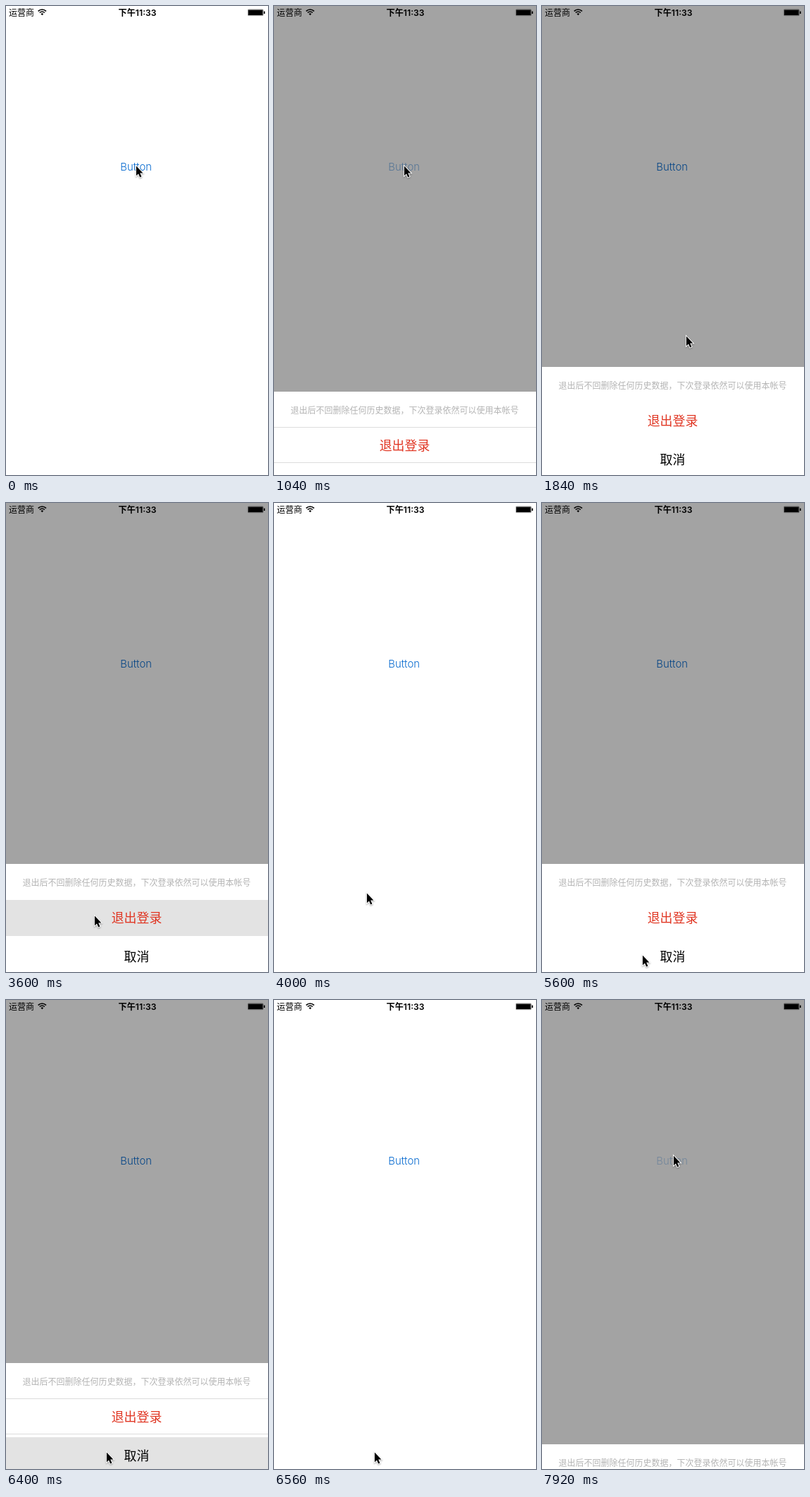
An HTML page with a canvas for the animation above (8 s loop, 372x664 px).

```html
<!DOCTYPE html>
<html lang="zh-CN">
<head>
<meta charset="utf-8">
<title>Action sheet</title>
<style>
  html, body { margin: 0; width: 100%; height: 100%; overflow: hidden; background: #fff; }
  canvas { display: block; width: 372px; height: 664px; }
</style>
</head>
<body>
<canvas id="stage" width="372" height="664"></canvas>
<script>
const W = 372, H = 664, LOOP = 8000, STEP = 80;
const SHEET_H = 153, SHOW_MS = 250, HIDE_MS = 180, FADE_MS = 470, DIM = 0.36;
const CJK = '"Noto Sans CJK SC", "Noto Sans CJK", sans-serif';
const LATIN = 'Inter, ' + CJK;
const ctx = document.getElementById('stage').getContext('2d');

// Each visit: button down, sheet shown, row pressed, sheet hidden
const visits = [
  { down: 690, show: 867, press: 3600, row: 'logout', hide: 3680 },
  { down: 4700, show: 4859, press: 6240, row: 'cancel', hide: 6385 },
  { down: 7580, show: 7842, press: Infinity, row: '', hide: Infinity }
];

// Pointer moves: when they begin and end, and where they lead
const home = { x: 184, y: 226 };
const moves = [
  { from: 1600, to: 1840, x: 204, y: 467 },
  { from: 1840, to: 3440, x: 125, y: 584 },
  { from: 3840, to: 4720, x: 190, y: 222 },
  { from: 5200, to: 5600, x: 142, y: 640 },
  { from: 6560, to: 7200, x: 188, y: 200 },
  { from: 7520, to: 7680, x: 186, y: 220 }
];

const clamp = v => Math.min(1, Math.max(0, v));
const ease = v => { v = clamp(v); return v * v * (3 - 2 * v); };
const mix = (a, b, k) => a + (b - a) * k;

function pointerAt(t) {
  let { x, y } = home;
  for (const m of moves) {
    const k = ease((t - m.from) / (m.to - m.from));
    x = mix(x, m.x, k);
    y = mix(y, m.y, k);
  }
  // Idle sweeps over the open sheet
  const k = clamp((t - 1840) / 1600), swing = Math.sin(Math.PI * k);
  x += 150 * swing * Math.sin(4 * Math.PI * k);
  y += 110 * swing * Math.sin(3 * Math.PI * k);
  return [Math.round(x), Math.round(y)];
}

function buttonAlpha(t) {
  const v = visits.find(v => t >= v.down && t < v.show + FADE_MS);
  if (!v) return 1;
  return t < v.show
    ? mix(1, 0.2, clamp((t - v.down) / 110))
    : mix(0.25, 1, ease((t - v.show) / FADE_MS));
}

function box(color, x, y, w, h) {
  ctx.fillStyle = color;
  ctx.fillRect(x, y, w, h);
}

function label(str, x, y, font, color, align = 'center') {
  ctx.font = font;
  ctx.fillStyle = color;
  ctx.textAlign = align;
  ctx.fillText(str, x, y);
}

function drawStatus() {
  label('运营商', 4, 13.7, '300 12px ' + CJK, '#000', 'left');
  label('下午11:33', 186.5, 13.7, '600 12.2px ' + LATIN, '#000');

  // Wi-Fi fan
  const a = Math.PI * 0.25;
  ctx.strokeStyle = '#000';
  ctx.lineWidth = 1.6;
  for (const r of [5, 8]) {
    ctx.beginPath();
    ctx.arc(51.3, 13, r, -Math.PI + a, -a);
    ctx.stroke();
  }
  ctx.fillStyle = '#000';
  ctx.beginPath();
  ctx.moveTo(51.3, 13.2);
  ctx.arc(51.3, 13, 2.7, -Math.PI + a, -a);
  ctx.fill();

  // Battery
  ctx.strokeStyle = 'rgba(0,0,0,0.6)';
  ctx.lineWidth = 0.6;
  ctx.beginPath();
  ctx.roundRect(343.3, 4.8, 22, 8.9, 1.5);
  ctx.stroke();
  box('#000', 344, 5.5, 20.6, 7.5);
  box('#000', 366, 7.5, 1.6, 3.5);
}

function drawSheet(t, v) {
  const gone = ease((t - v.hide) / HIDE_MS);
  const shown = ease((t - v.show) / SHOW_MS) * (1 - gone);
  box(`rgba(0,0,0,${DIM * (1 - gone)})`, 0, 0, W, H);

  const top = Math.round(H - SHEET_H * shown);
  box('#fff', 0, top, W, SHEET_H);
  if (shown < 1) {
    box('#dcdcdc', 0, top + 50, W, 1);
    box('#dcdcdc', 0, top + 100, W, 1);
  }
  if (t >= v.press) {
    if (v.row === 'logout') box('#e3e3e3', 0, top + 51, W, 51);
    else box('#e3e3e3', 0, top + 105, W, 48);
  }
  label('退出后不回删除任何历史数据，下次登录依然可以使用本帐号',
    185.5, top + 30.7, '300 12px ' + CJK, '#b4b4b4');
  label('退出登录', 185.5, top + 83, '17.9px ' + CJK, '#e03522');
  label('取消', 185.5, top + 138, '17.9px ' + CJK, '#000');
}

function drawPointer(x, y) {
  ctx.save();
  ctx.translate(x + 0.7, y);
  ctx.beginPath();
  ctx.moveTo(0.2, 0.6);
  ctx.lineTo(0.2, 14.2);
  ctx.lineTo(3.3, 11.4);
  ctx.lineTo(5.5, 16.4);
  ctx.lineTo(7.7, 15.5);
  ctx.lineTo(5.5, 10.6);
  ctx.lineTo(9.7, 10.4);
  ctx.closePath();
  ctx.shadowColor = 'rgba(0,0,0,0.35)';
  ctx.shadowBlur = 2;
  ctx.shadowOffsetY = 1;
  ctx.strokeStyle = '#fff';
  ctx.lineWidth = 2;
  ctx.stroke();
  ctx.shadowColor = 'transparent';
  ctx.fillStyle = '#000';
  ctx.fill();
  ctx.restore();
}

function draw(t) {
  box('#fff', 0, 0, W, H);
  ctx.globalAlpha = buttonAlpha(t);
  label('Button', 184.6, 233.3, '300 14.9px ' + LATIN, '#0a6cd0');
  ctx.globalAlpha = 1;

  const v = visits.find(v => t >= v.show - STEP / 4 && t < v.hide + HIDE_MS - 8);
  if (v) drawSheet(t, v);
  drawStatus();
  drawPointer(...pointerAt(t));
}

const start = performance.now();
function tick() {
  const t = (performance.now() - start) % LOOP;
  draw(Math.floor(t / STEP) * STEP);
  requestAnimationFrame(tick);
}
tick();
</script>
</body>
</html>
```
